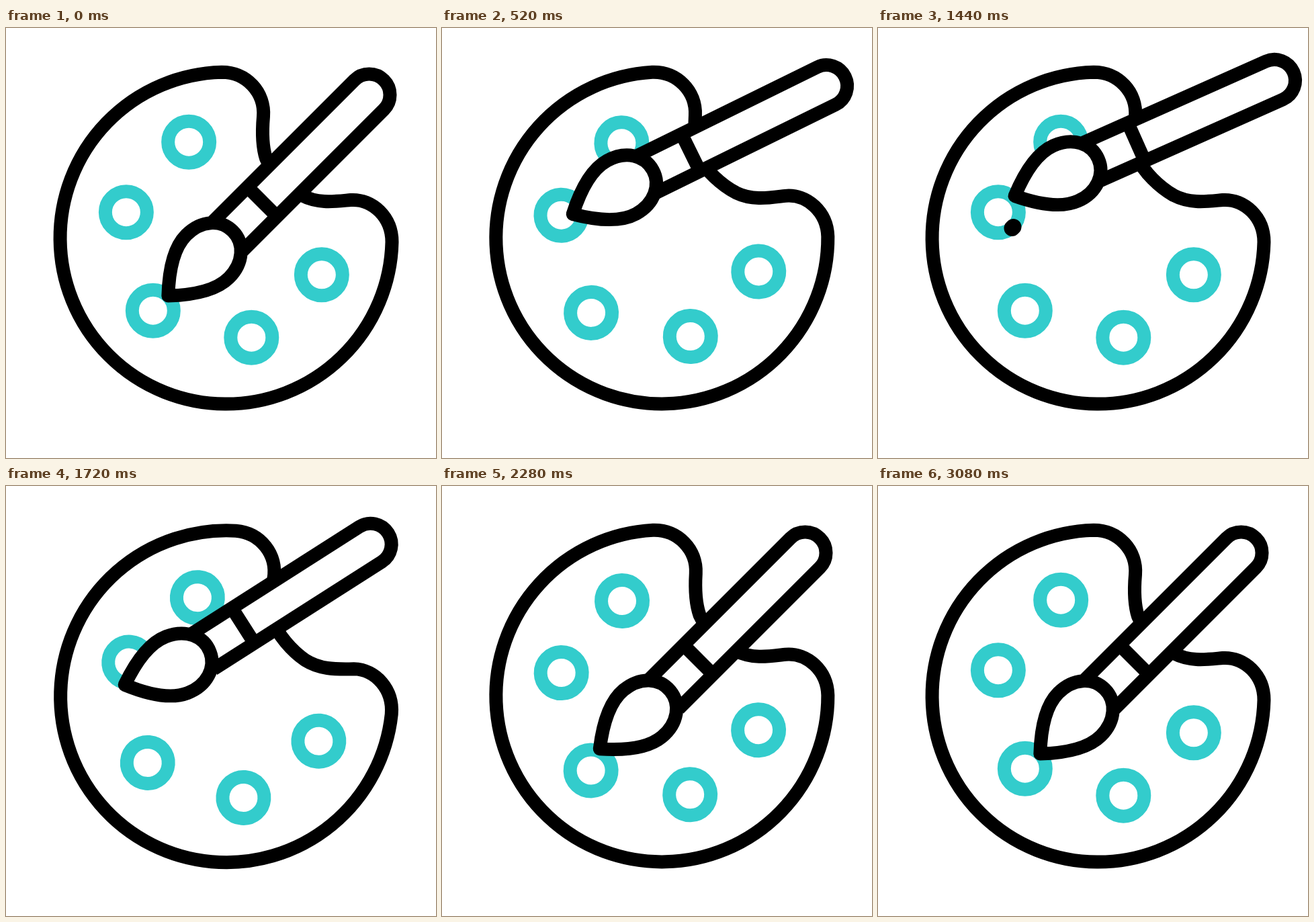
These frames come from a looping animation (640x640 px, 3.28 s). An HTML page with a canvas:

```html
<!DOCTYPE html>
<html>
<head>
<meta charset="utf-8">
<style>
html, body { margin: 0; width: 100%; height: 100%; overflow: hidden; background: #fff; }
canvas { display: block; }
</style>
</head>
<body>
<canvas id="stage" width="640" height="640"></canvas>
<script>
const ctx = document.getElementById('stage').getContext('2d');
const LOOP = 3280, STEP = 40, RETURN = 1440;
const NECK = -320;

const palette = new Path2D(
  'M321 65.7 A247 247 0 1 0 574.5 318.5 C574.5 282 546 254 513 256 ' +
  'C490 258 465 262 440 249 C419 237 395 214 387 194 ' +
  'C381 175 381 155 383 132 C386 96 358 65.7 321 65.7 Z');
const handle = new Path2D('M-297 -31 H0 A31 31 0 0 1 0 31 H-297');
const band = new Path2D('M-225 -31 V31');
const bristles = new Path2D(
  'M-103 0 C-84 -18 -52 -45 -20 -45 S33 -25 33 0 S11 45 -20 45 S-84 18 -103 0 Z');

const rad = deg => deg * Math.PI / 180;
const part = (t, from, span) => Math.min(1, Math.max(0, (t - from) / span));
const ease = (t, from, span) => {
  const p = part(t, from, span);
  return p * p * (3 - 2 * p);
};

// One rock of the palette: right, left, then level.
const rock = (t, from) =>
  5 * ease(t, from, 320) - 10 * ease(t, from + 320, 320) + 5 * ease(t, from + 640, 320);

// The handle sweeps up and back along an arc; the bristles trail behind it.
function brushPose(t) {
  const out = ease(t, 0, 650), back = ease(t, RETURN, 640);
  const raised = out - back;
  const arc = Math.sin(Math.PI * out);
  const reach = ease(t, 320, 340) - ease(t, RETURN, 320);
  const settle = (1 - part(t, RETURN + 320, 1280)) ** 1.5;
  return {
    x: 540.5 + 49.5 * reach + arc,
    y: 99.5 - 21.5 * raised + 18.5 * arc,
    angle: 45 - 21 * raised,
    lag: 8.2 * arc - 12 * ease(t, RETURN, 320) * settle
  };
}

function outline(path) {
  ctx.fill(path);
  ctx.stroke(path);
}

function drawPalette(t) {
  ctx.save();
  ctx.translate(320, 320);
  ctx.rotate(rad(rock(t, 0) + rock(t, RETURN)));
  ctx.translate(-320, -320);
  ctx.stroke(palette);
  ctx.strokeStyle = '#33cccc';
  for (const turn of [-114, -59.5, 0, 59.5, 114]) {
    const a = rad(135 + turn);
    ctx.beginPath();
    ctx.arc(327 + 153 * Math.cos(a), 312.5 + 153 * Math.sin(a), 31, 0, 7);
    ctx.stroke();
  }
  ctx.restore();
}

function drawDab() {
  ctx.save();
  ctx.lineCap = 'round';
  ctx.lineWidth = 24;
  ctx.beginPath();
  ctx.moveTo(199.5, 298);
  ctx.lineTo(201.5, 296);
  ctx.stroke();
  ctx.restore();
}

function drawBrush(t) {
  const pose = brushPose(t);
  ctx.save();
  ctx.translate(pose.x, pose.y);
  ctx.rotate(-rad(pose.angle));
  outline(handle);
  ctx.stroke(band);
  ctx.translate(NECK, 0);
  ctx.rotate(-rad(pose.lag));
  outline(bristles);
  ctx.restore();
}

function draw(t) {
  ctx.fillStyle = '#fff';
  ctx.fillRect(0, 0, 640, 640);
  ctx.strokeStyle = '#000';
  ctx.lineWidth = 20;
  ctx.lineJoin = 'round';
  drawPalette(t);
  if (t >= RETURN - STEP && t < RETURN + 200) drawDab();
  drawBrush(t);
}

const start = performance.now();
function frame() {
  const t = (performance.now() - start) % LOOP;
  draw(Math.floor(t / STEP) * STEP);
  requestAnimationFrame(frame);
}
frame();
</script>
</body>
</html>
```
